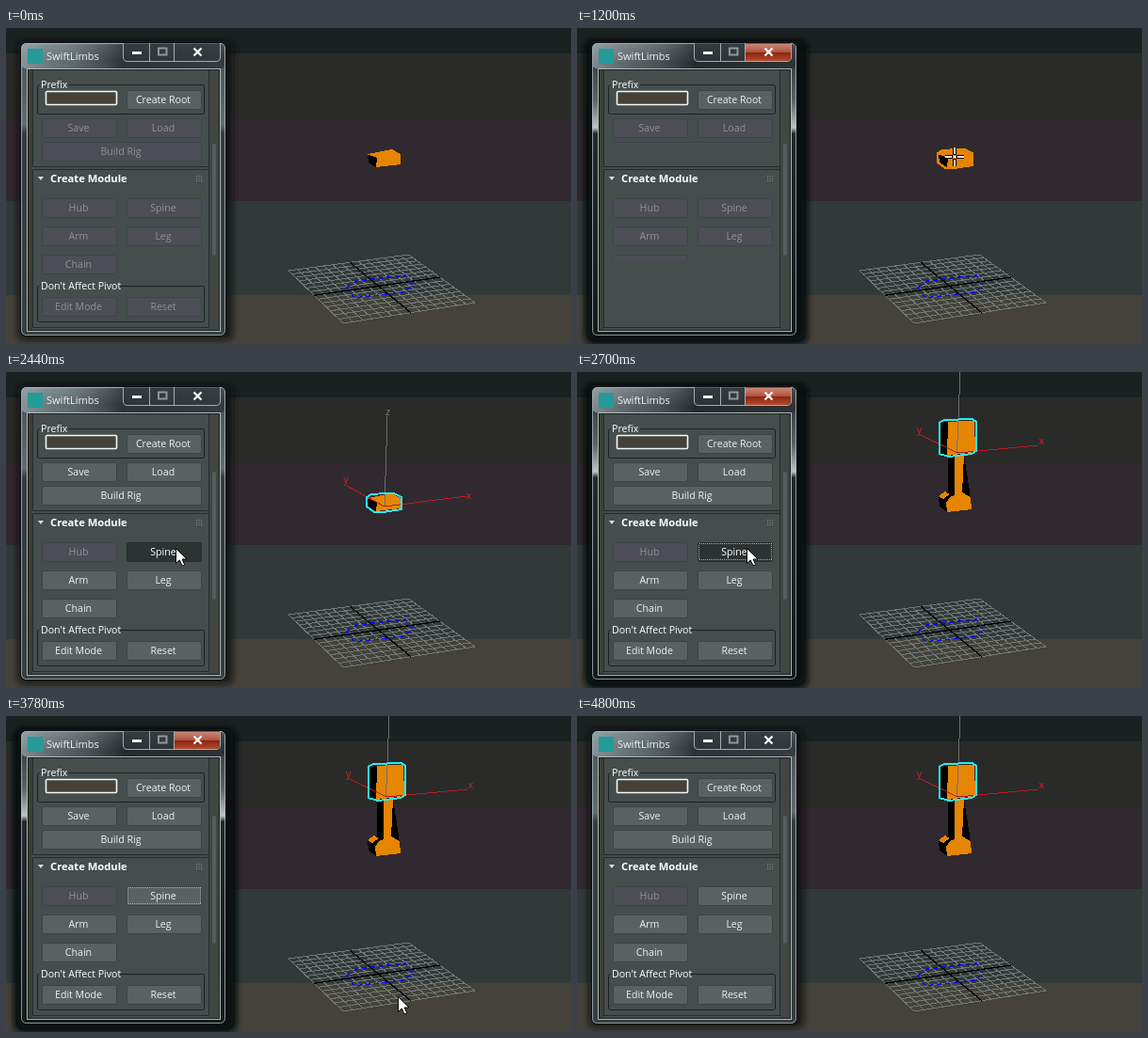
Animation of 600x336 px, one loop 4930 ms. Source, as an HTML page:

```html
<!DOCTYPE html>
<html lang="en">
<head>
<meta charset="utf-8">
<title>Rig builder</title>
<style>
  html, body { margin: 0; width: 100%; height: 100%; overflow: hidden; background: #1a2222; }
  svg { display: block; width: 100vw; height: 100vh; }
  text { font: 10.6px "Open Sans", "Noto Sans", sans-serif; fill: #f0f2f2; }
  .mid { text-anchor: middle; }
  .btn rect { fill: #596161; stroke: #3c4343; }
  .btn.off rect, #stage:not(.enabled) .mod rect { fill: #4d4d55; stroke: #414248; }
  .btn.off text, #stage:not(.enabled) .mod text { fill: #8f9292; }
  .pressed #spine rect { fill: #2d3333; stroke: #272c2c; }
  .pressed #spine text { fill: #fff; }
  .line { fill: none; stroke: #252c2d; }
  .box { fill: none; stroke: #1b2123; }
  .orange { fill: #e58500; }
  .glow { fill: none; stroke: #2ceaf2; stroke-width: 2; stroke-linejoin: round; }
  .red { fill: none; stroke: #b91c20; }
  .label { fill: #d22327; font-size: 11px; text-anchor: middle; }
  .gray { fill: none; stroke: #6b6f6f; }
  .crisp { shape-rendering: crispEdges; }
</style>
</head>
<body>
<svg id="stage" viewBox="0 0 600 336" preserveAspectRatio="none">
  <defs>
    <filter id="soft" x="-10%" y="-10%" width="120%" height="120%"><feGaussianBlur stdDeviation="3"/></filter>
    <linearGradient id="idleFrame" x2="0" y2="1">
      <stop offset="0" stop-color="#758287"/><stop offset=".06" stop-color="#4b5659"/>
      <stop offset=".28" stop-color="#626d70"/><stop offset=".31" stop-color="#363d41"/>
      <stop offset="1" stop-color="#354040"/>
    </linearGradient>
    <linearGradient id="liveFrame" x2="0" y2="1">
      <stop offset="0" stop-color="#72797c"/><stop offset=".07" stop-color="#3a4042"/>
      <stop offset=".2" stop-color="#5d6567"/><stop offset=".29" stop-color="#c0c6c6"/>
      <stop offset=".31" stop-color="#24282b"/><stop offset="1" stop-color="#151a1b"/>
    </linearGradient>
    <linearGradient id="sheen">
      <stop offset="0" stop-color="#a4b4b9" stop-opacity=".65"/><stop offset=".2" stop-color="#8b999d" stop-opacity=".35"/>
      <stop offset=".5" stop-color="#171c20" stop-opacity=".6"/><stop offset="1" stop-color="#1d2326" stop-opacity=".5"/>
    </linearGradient>
    <linearGradient id="closeRed" x2="0" y2="1">
      <stop offset="0" stop-color="#c98676"/><stop offset=".48" stop-color="#b05440"/>
      <stop offset=".52" stop-color="#8c2413"/><stop offset="1" stop-color="#b34b2c"/>
    </linearGradient>
    <path id="rootEdge" d="M383 133L388 130 411 128.500 420 133V146L397 149.500 391 149 383 143Z"/>
  </defs>

  <g class="crisp">
    <rect width="600" height="27" fill="#1a2121"/>
    <rect y="27" width="600" height="70" fill="#2a2a29"/>
    <rect y="97" width="600" height="87" fill="#312930"/>
    <rect y="184" width="600" height="100" fill="#323a39"/>
    <rect y="284" width="600" height="52" fill="#44423a"/>
  </g>

  <g id="grid" class="crisp"></g>

  <g id="root" class="crisp">
    <use id="rootHover" href="#rootEdge" fill="#e58500" stroke="#e58500" stroke-width="2"/>
    <path class="orange" d="M384 134L410 129 419 134V145L393 148 385 143Z"/>
    <path d="M384 134.500L394 138 393 148.500 385 143Z"/>
  </g>
  <g id="rootAxes" class="crisp">
    <path class="gray" d="M402 143L405 47"/>
    <path class="red" d="M362 121L402 143 489 132"/>
    <use class="glow" href="#rootEdge"/>
    <text class="label" x="361" y="118">y</text><text class="label" x="491.500" y="135">x</text>
    <text class="label" x="405.500" y="46" style="fill:#7b7f7f">z</text>
  </g>

  <g id="spineRig" class="crisp">
    <path d="M384 133L391 127 394 128V88H411L418 134V146L393 149 385 143Z"/>
    <path class="orange" d="M384 132L391 127 396 130 389 135Z"/>
    <path class="orange" d="M392 139L396 133 401 131V88H411L409 128 418 133 419 146 393 149Z"/>
    <path class="orange" d="M394 53L422 51.500 423 85 393 89Z"/>
    <path d="M385 54L394 53 393 89 385 86Z"/>
    <path class="gray" d="M403.500 86L407 0"/>
    <path class="red" d="M363 66L404 86 490 78"/>
    <path class="glow" d="M384.500 54L390 51 420 50 424 53V84L419 87 395 90 384.500 87Z"/>
    <text class="label" x="363.500" y="65">y</text><text class="label" x="493.500" y="77">x</text>
  </g>

  <g id="window">
    <rect id="liveShadow" x="8" y="14" width="237" height="323" rx="9" fill="#05080a" opacity=".85" filter="url(#soft)"/>
    <rect x="12" y="14" width="229" height="318" rx="8" fill="#080c0e" opacity=".75" filter="url(#soft)"/>
    <rect id="frame" x="15.500" y="15.500" width="218" height="312" rx="6" stroke="#0a0e10"/>
    <rect x="16.500" y="16.500" width="216" height="310" rx="5" fill="none" stroke="#b4bfc1" stroke-opacity=".75"/>
    <rect x="17" y="17" width="215" height="26" rx="4" fill="url(#sheen)"/>
    <rect x="23" y="22" width="16" height="16" fill="#249a99"/>
    <text x="43" y="34" style="font-size:11px">SwiftLimbs</text>
    <path d="M124.500 16V31Q124.500 35.500 129 35.500H223Q227.500 35.500 227.500 31V16" fill="#30373b" fill-opacity=".65" stroke="#a3adaf"/>
    <path id="closeFill" d="M179 17H227V31Q227 35 223 35H179Z" fill="url(#closeRed)"/>
    <path d="M152.500 16V35M178.500 16V35" stroke="#a3adaf"/>
    <path d="M134 26.500H144" stroke="#f2f3f3" stroke-width="3"/>
    <rect x="162" y="21.500" width="8.500" height="7" fill="none" stroke="#90979a" stroke-width="2"/>
    <path d="M199.500 21.500L207.500 29.500M207.500 21.500L199.500 29.500" stroke="#fff" stroke-width="2.200"/>
    <rect x="22.500" y="43.500" width="205" height="279" fill="#444d4c" stroke="#b1bbbc"/>
    <rect x="23.500" y="44.500" width="203" height="277" fill="none" stroke="#171d1e"/>
    <rect x="24" y="45" width="4" height="276" fill="#3d3f36"/>
    <rect x="216" y="45" width="10" height="276" fill="#414643"/>
    <rect id="thumb" x="219" width="4" rx="2" fill="#565e5d"/>
    <g id="panel"></g>
    <g id="repaint" fill="#454e4d"><rect x="29" y="124" width="186" height="23"/><rect x="29" y="246" width="186" height="72"/></g>
    <rect id="focus" class="crisp" x="129.500" y="182.500" width="77" height="17" fill="none" stroke="#a9afaf" stroke-dasharray="1 1"/>
  </g>

  <path id="arrow" d="M.5 .5V16.500L4.300 13 7 19 9.700 17.800 7.100 12H12Z" fill="#fff" stroke="#050505"/>
  <g id="cross" class="crisp" fill="none">
    <path d="M-10 0H-2M2 0H10M0 -10V-2M0 2V10" stroke="#000" stroke-width="4"/>
    <path d="M-10 0H-3M3 0H10M0 -10V-3M0 3V10M-1 0H1" stroke="#fff" stroke-width="2"/>
  </g>
</svg>
<script>
const LOOP = 4930, STEP = 60;
const $ = id => document.getElementById(id);
const stage = $('stage');

// Unit square to the ground plane, in perspective.
function groundMap([ax, ay], [bx, by], [cx, cy], [dx, dy]) {
  const ex = bx - cx, ey = by - cy, fx = dx - cx, fy = dy - cy;
  const sx = ax - bx + cx - dx, sy = ay - by + cy - dy;
  const det = ex * fy - ey * fx;
  const g = (sx * fy - sy * fx) / det, h = (ex * sy - ey * sx) / det;
  return (u, v) => {
    const w = 1 + g * u + h * v;
    const x = ax + (bx - ax + g * bx) * u + (dx - ax + h * dx) * v;
    const y = ay + (by - ay + g * by) * u + (dy - ay + h * dy) * v;
    return `${(x / w).toFixed(1)} ${(y / w).toFixed(1)}`;
  };
}

function drawGrid() {
  const at = groundMap([300, 258], [427.5, 241], [498, 292], [358, 314]);
  const cells = 14;
  const cross = k => `M${at(k, 0)}L${at(k, 1)}M${at(0, k)}L${at(1, k)}`;
  let lines = '';
  for (let i = 0; i <= cells; i++) if (i !== cells / 2) lines += cross(i / cells);
  $('grid').innerHTML = `<path d="${lines}" stroke="#707978"/>
    <path d="${cross(.5)}" stroke="#000" stroke-width="1.3"/>
    <path d="M362 276L372 269 424 263 432 274 422 281 370 287Z" fill="none"
      stroke="#0909f5" stroke-width="1.5" stroke-dasharray="5 4"/>`;
}

function button(x, y, label, kind = 'mod', w = 80, id = '') {
  return `<g class="btn ${kind}" id="${id}"><rect x="${x + .5}" y="${y + .5}" width="${w - 1}" height="20" rx="2"/>
    <text class="mid" x="${x + w / 2 - 1}" y="${y + 14}">${label}</text></g>`;
}

function group(y, h, label, w) {
  return `<rect class="box" x="33.500" y="${y + .5}" width="177" height="${h}" rx="2"/>
    <rect x="36" y="${y - 2}" width="${w}" height="5" fill="#454e4d"/>
    <text x="37" y="${y + 4}" style="fill:#fff">${label}</text>`;
}

function drawPanel() {
  const L = 38, R = 128;
  let dots = '';
  for (let i = 0; i < 9; i++) dots += `M${202 + i % 3 * 2.5} ${157.500 + Math.floor(i / 3) * 2.5}h1`;
  $('panel').innerHTML = `
    <path d="M28 45H215V147H28ZM28 150H215V319H28Z" fill="#454e4d"/>
    <path class="line" d="M28.500 45V147.500H215M28.500 319V150.500H215M215.500 45V319M28 318.500H215"/>
    ${group(60, 31, 'Prefix', 31)}
    <rect x="42.500" y="67.500" width="75" height="14" rx="1" fill="#444238" stroke="#f5f6f5" stroke-width="1.600"/>
    ${button(R, 66, 'Create Root', 'on')}
    ${button(L, 96, 'Save')}${button(R, 96, 'Load')}
    ${button(L, 121, 'Build Rig', 'mod', 170)}
    <path d="M34 158H40L37 162Z" fill="#d5d9d9"/>
    <text x="47" y="164" style="font-weight:700;font-size:11.200px;fill:#fff">Create Module</text>
    <path d="${dots}" stroke="#8b9292"/>
    ${button(L, 181, 'Hub', 'off')}${button(R, 181, 'Spine', 'mod', 80, 'spine')}
    ${button(L, 211, 'Arm')}${button(R, 211, 'Leg')}
    ${button(L, 241, 'Chain')}
    ${group(274, 38, "Don't Affect Pivot", 84)}
    ${button(L, 286, 'Edit Mode')}${button(R, 286, 'Reset')}`;
}

// Pointer keys: time, x, y.
const path = [
  [520, 589, 264], [760, 466, 180], [940, 401, 137], [1590, 394, 141], [1890, 313, 185],
  [2070, 236, 196], [2310, 184, 189], [2440, 180, 187], [3360, 180, 187],
  [3420, 193, 189], [3660, 330, 250], [3840, 459, 322], [3900, 480, 340]
];

function pointerAt(t) {
  const i = path.findIndex((k, n) => n + 1 < path.length && t < path[n + 1][0]);
  const [t0, x0, y0] = path[i], [t1, x1, y1] = path[i + 1];
  if (t0 === 940) return [x0, y0];
  const f = Math.floor((t - t0) / STEP) * STEP / (t1 - t0);
  return [Math.round(x0 + (x1 - x0) * f), Math.round(y0 + (y1 - y0) * f)];
}

const show = (id, on) => $(id).style.display = on ? '' : 'none';

function render(now) {
  const t = now % LOOP;
  const during = (a, b) => t >= a && t < b;
  const live = during(1200, 1260) || during(2570, 4500);
  const enabled = t >= 1260;
  stage.classList.toggle('enabled', enabled);
  stage.classList.toggle('pressed', during(2440, 3480));
  $('frame').setAttribute('fill', live ? 'url(#liveFrame)' : 'url(#idleFrame)');
  const thumbTop = enabled ? 106 : 123;
  $('thumb').setAttribute('y', thumbTop);
  $('thumb').setAttribute('height', 242 - thumbTop);
  show('liveShadow', live);
  show('closeFill', live);
  show('repaint', during(1200, 1260));
  show('focus', during(2570, 4500));
  show('root', t < 2700);
  show('rootHover', during(880, 1260));
  show('rootAxes', during(1260, 2700));
  show('spineRig', t >= 2700);
  const crossed = during(880, 1590), visible = during(520, 3900);
  show('cross', crossed);
  show('arrow', visible && !crossed);
  if (visible) {
    const place = `translate(${pointerAt(t).join(' ')})`;
    $('arrow').setAttribute('transform', place);
    $('cross').setAttribute('transform', place);
  }
}

drawGrid();
drawPanel();
const start = performance.now();
function tick() {
  render(performance.now() - start);
  requestAnimationFrame(tick);
}
tick();
</script>
</body>
</html>
```
